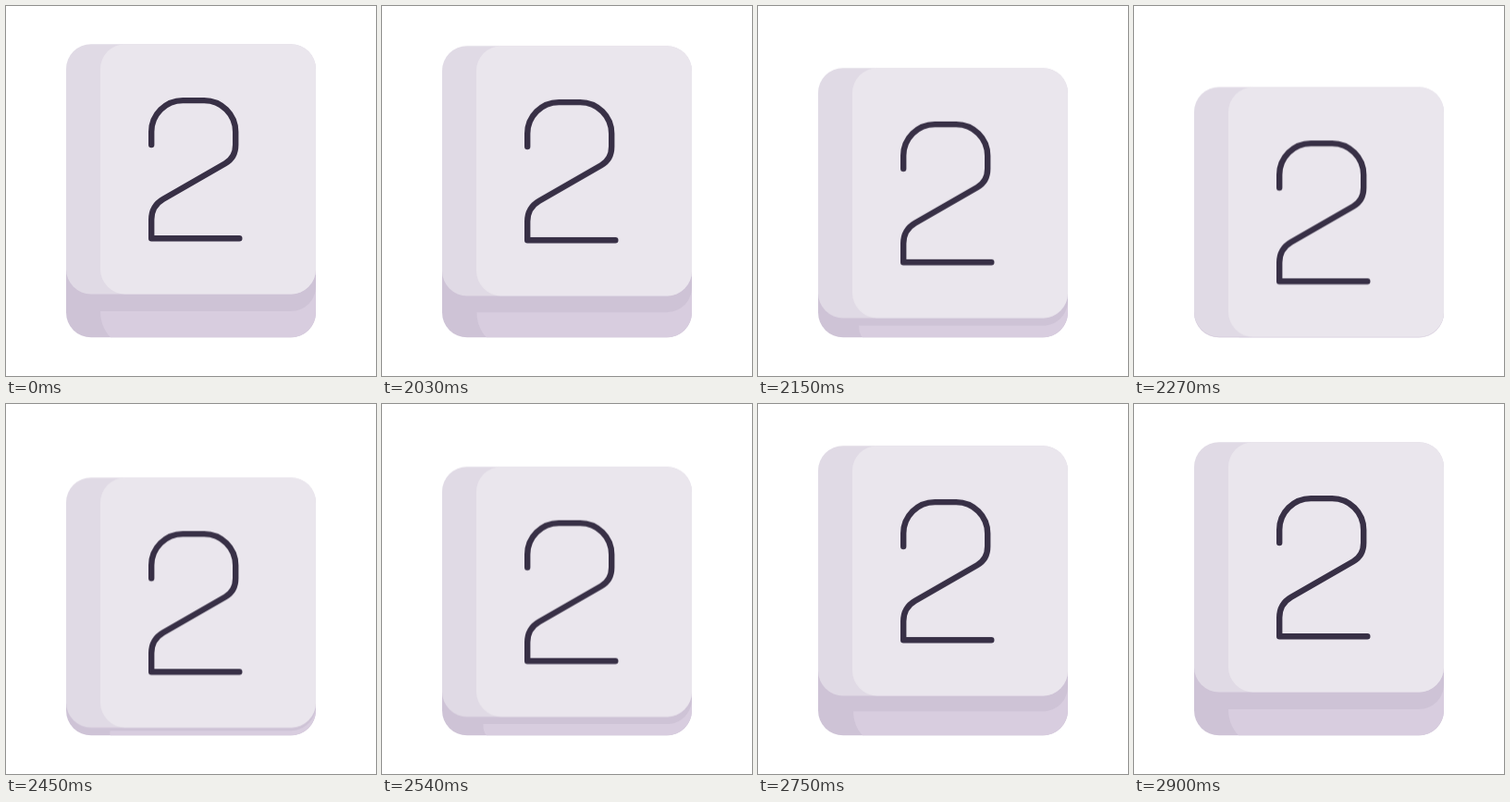
Animation, 400 px wide and 400 px high, one loop 2.93 s. Source, as an HTML page:

```html
<!DOCTYPE html>
<html lang="en">
<head>
<meta charset="utf-8">
<title>Key press</title>
<style>
  html, body { margin: 0; width: 100%; height: 100%; overflow: hidden; background: #fff; }
  svg { display: block; width: 100vw; height: 100vh; }

  /* Paused animations, positioned by --t (ms) */
  .cap, .panel {
    animation: press 2930ms linear infinite paused;
    animation-delay: calc(var(--t, 0) * -1ms);
  }
  .panel { animation-name: squash; }

  @keyframes press {
    0%, 68.09% { transform: translateY(0); animation-timing-function: cubic-bezier(.333, 0, .667, 1); }
    77.99% { transform: translateY(46.8px); animation-timing-function: cubic-bezier(.4, 0, .47, 1); }
    98.97%, 100% { transform: translateY(0); }
  }
  @keyframes squash {
    0%, 68.09% {
      d: path("M102 330 H308 C323 330 335 318 335 303 V331 C335 346 323 358.3 308 358.3 H113 C106 351 102 341 102 330 Z");
      animation-timing-function: cubic-bezier(.333, 0, .667, 1);
    }
    77.99% {
      d: path("M115 358.3 H308 C323 358.3 335 346 335 331 V331 C335 346 323 358.3 308 358.3 H113 C113 358.3 115 358.3 115 358.3 Z");
      animation-timing-function: cubic-bezier(.4, 0, .47, 1);
    }
    98.97%, 100% {
      d: path("M102 330 H308 C323 330 335 318 335 303 V331 C335 346 323 358.3 308 358.3 H113 C106 351 102 341 102 330 Z");
    }
  }
</style>
</head>
<body>
<svg viewBox="0 0 400 400">
  <rect x="65" y="200" width="270" height="158.3" rx="27" fill="#cec3d6"/>
  <path class="panel" fill="#d8cddf" d="M102 330 H308 C323 330 335 318 335 303 V331 C335 346 323 358.3 308 358.3 H113 C106 351 102 341 102 330 Z"/>
  <g class="cap">
    <rect x="65" y="41.2" width="270" height="270.3" rx="27" fill="#e0dae5"/>
    <rect x="102" y="41.2" width="233" height="270.3" rx="27" fill="#eae6ed"/>
    <path fill="none" stroke="#383046" stroke-width="6.4" stroke-linecap="round" stroke-linejoin="round"
      d="M157.2 150 V136 A34 34 0 0 1 191.2 102.1 H214.2 A34 34 0 0 1 248.2 136 V150 C248.2 159 244.5 166 237 170.2 L170 208.7 C162 213.3 157.2 221 157.2 231 V251.2 H252.3"/>
  </g>
</svg>
<script>
  const LOOP = 2930, START = 2030, STEP = 30;

  // The key rests until START, then moves in held steps.
  function draw() {
    const t = performance.now() % LOOP;
    const held = t < START ? 0 : START + Math.floor((t - START) / STEP) * STEP;
    document.documentElement.style.setProperty('--t', held);
    requestAnimationFrame(draw);
  }
  draw();
</script>
</body>
</html>
```
